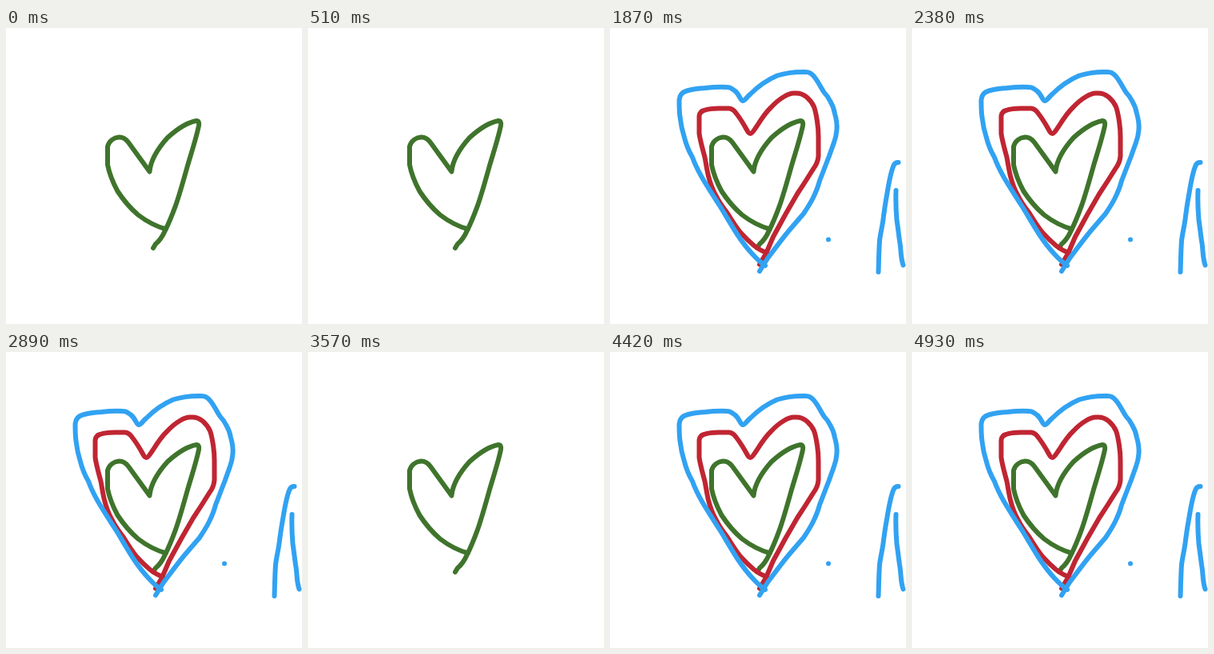
An HTML page that plays this animation: 370 by 370 pixels, repeating every 5100 ms.

```html
<!DOCTYPE html>
<html lang="en">
<head>
<meta charset="utf-8">
<title>Hearts</title>
<style>
  html, body { margin: 0; width: 100%; height: 100%; overflow: hidden; background: #fff; }
  svg { display: block; width: 100%; height: 100%; }
  path { fill: none; stroke-width: 6; stroke-linecap: round; stroke-linejoin: round; }
</style>
</head>
<body>
<svg viewBox="0 0 370 370">
  <g class="layer" stroke="#3f742c">
    <path d="M200 251.500C188 248 176 242 165 233.500C154 224 146 214 139.500 204C133 192 129 181 127 171V148C129 141 135 137 141 136.500C147 136 150 139 153 143L179.500 179.500C181 162 193 147 202 137C212 128 226 118 238 116Q242 116 241 122C238 137 232 155 227 172C222 190 217 208 212 222C208 233 204 243 199 253C195 262 192 266 187 270L184 275"/>
  </g>
  <g class="layer" stroke="#c02532">
    <path d="M196 281C190 279 185 276 180 272C174 267 168 261 163 255.500C157 248 152 240 146.500 231C141 224 136 217 132.500 209.500C128 202 125 193 123 185C121 177 120 169 118.500 161.500C116 152 113 142 111.500 132V110C112 106 114 104 117.500 103C123 101 130 100.500 136 100.500H149C153 101 156 104 158 107C162 112 165 117 168 122C171 127 173 132 175.500 132C178 132 181 126 184 122C189 114 194 106 201 99.500C206 94 212 89 218 85.500C222 83 227 81 231 81.500C237 81 242 83 246 86.500C250 90 253 94 255 98.500C257 104 258 110 259 116.500C260 123 260.500 130 260.500 136V160C260 166 258 171 254.500 175.500C248 186 241 197 234 207.500L219 233.500L204 261L195 282L187 295.500"/>
  </g>
  <g class="layer" stroke="#31a2f2">
    <path d="M194 297C188 293 182 287 177.500 282C171 275 165 267 159 258C152 247 145 235 138 223.500C130 211 122 199 114.500 186C110 178 106 170 103 161.500C98 153 95 145 93 137C90 128 88.500 120 87.500 111C86.500 104 86.500 97 86.500 90C87 84 90 80 96 78.500C103 76.500 111 75.500 119 75C128 74 137 73.500 146.500 74C150 74 153 76 156 78.500C162 83 163 91 166 91C169 91 171 86 175 83C185 73 196 65 209 59.500C220 56 233 54.500 245 55C249 55 252 57 254.500 60C260 66 263 74 268 81C271 84 273 87 275 91C278 96 280 101 281 107C283 114 284 121 283.500 127C283 133 282 138 280 143C278 149 276 154 274 160C270 170 266 181 262 191C260 199 257 206 253.500 213C250 220 246 226 242 232C236 239 230 246 223.500 253.500C214 265 206 276 197 288L187 304"/>
    <path d="M360.500 168Q356 168 354.500 172C350 182 348 198 345.500 212C344 220 343 228 342 235C341 246 338 256 337 266C336 279 336 292 335.500 305"/>
    <path d="M357.500 203C357 215 357.500 228 358.500 240C360 250 361 259 362 266C364 276 363 287 366.500 296.500"/>
    <circle cx="273" cy="264.500" r="3" fill="#31a2f2" stroke="none"/>
  </g>
</svg>
<script>
  const STEP = 170;
  const layers = document.querySelectorAll(".layer");
  const start = performance.now();

  // Each step adds one heart, then the stack starts over.
  function draw(ms) {
    const top = Math.floor(ms / STEP) % layers.length;
    layers.forEach((layer, i) => {
      layer.style.display = i <= top ? "" : "none";
    });
  }

  function tick() {
    draw(performance.now() - start);
    requestAnimationFrame(tick);
  }

  draw(0);
  requestAnimationFrame(tick);
</script>
</body>
</html>
```
